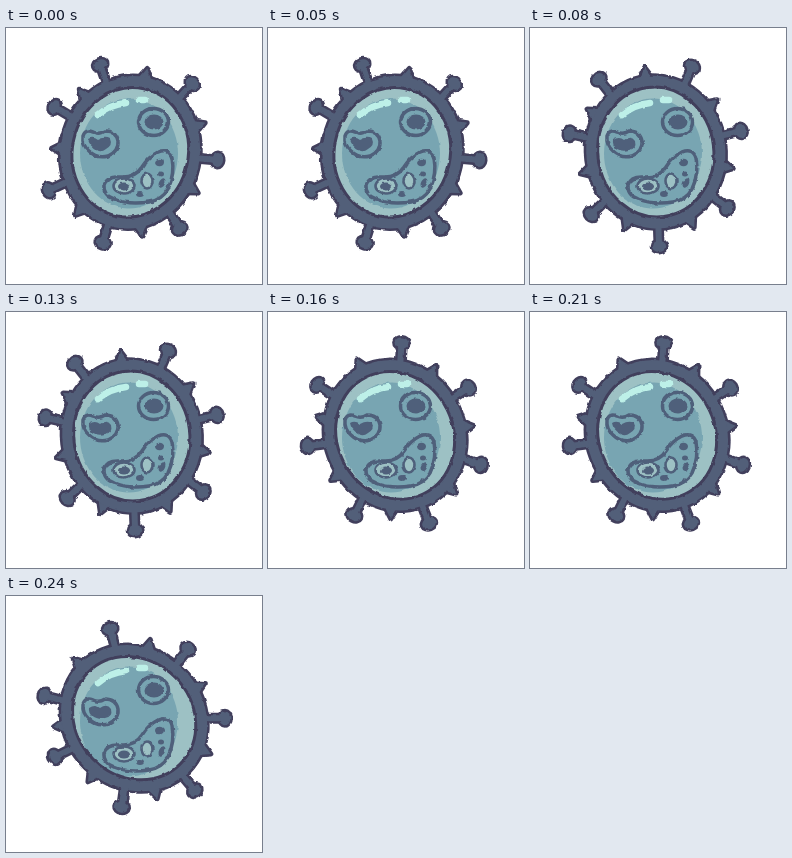
Recreate the animation shown at these times as an HTML page. Size 256 by 256 pixels, loop 0.32 s.

```html
<!DOCTYPE html>
<html lang="en">
<head>
<meta charset="utf-8">
<title>Rolling virus</title>
<style>
  html, body { margin: 0; width: 100%; height: 100%; overflow: hidden; background: #fff; }
  svg { display: block; width: 100vw; height: 100vh; }
</style>
</head>
<body>
<svg id="stage" viewBox="0 0 256 256"></svg>
<script>
const POSES = 4, STEP = 80, TURN = -19, TILT = 12;
const SHELL = '#525f79', INK = '#413f5c', LINE = '#4f607b';
const PALE = '#9dc1c4', TEAL = '#78a5b2', SHINE = '#bdf0e8';

// The shell is an upright oval around its own origin; the knobs sit unevenly on it.
const WIDTH = 69.5, HEIGHT = 76.5;
const knobAngles = [-121, -60, -7, 45, 95, 143, 199];
const thornAngles = knobAngles.map((a, i) => (a + (knobAngles[i + 1] ?? knobAngles[0] + 360)) / 2);

const ellipse = (cx, cy, rx, ry, attrs = '') =>
  `<ellipse cx="${cx}" cy="${cy}" rx="${rx}" ry="${ry}" ${attrs}/>`;
const path = (d, attrs = '') => `<path d="${d}" ${attrs}/>`;

// Distance from the origin to a point raised above the shell.
function reach(angle, raise) {
  const a = angle * Math.PI / 180;
  return 1 / Math.hypot(Math.cos(a) / (WIDTH + raise), Math.sin(a) / (HEIGHT + raise));
}

function knob(angle) {
  const r = reach(angle, 18);
  return `<g transform="rotate(${angle})">` +
    path(`M0 0H${r}`, 'stroke-width="var(--stem)"') + ellipse(r, 0, 5.5, 7) + '</g>';
}

function thorn(angle) {
  const r = reach(angle, 9);
  return path(`M${r} 0L${r - 14} 8V-8Z`, `transform="rotate(${angle})"`);
}

const outside = knobAngles.map(knob).join('') + thornAngles.map(thorn).join('') +
  ellipse(0, 0, WIDTH, HEIGHT);
const fluid = attrs => ellipse(0, 0, 58, 65, attrs);

const beans = [
  'M82 111Q87 108 92 112Q99 108 104 111Q107 117 100 121Q95 125 91 122Q83 118 82 111Z',
  'M83 112Q89 108 94 112Q101 107 105 113Q107 121 99 122Q92 124 87 121Q82 117 83 112Z'
];

const face = bean => `
  <g fill="none" stroke="${SHINE}" stroke-linecap="round" stroke-width="6.5">
    ${path('M92 87Q103 77 120 75M133 72L139 72')}
  </g>
  <g fill="none" stroke="${LINE}" stroke-width="3.5">
    ${path('M77 108Q79 101 87 104Q93 107 99 103Q110 103 112 113Q113 123 102 128Q91 131 83 123Q76 117 77 108Z')}
    ${ellipse(147.5, 94, 15, 13.5)}
    ${path('M98 157Q101 148 114 149Q129 150 136 139Q142 129 152 124Q163 120 166 130' +
      'Q169 146 162 161Q156 172 143 174Q122 177 108 171Q97 167 98 157Z')}
    ${ellipse(118, 158, 10.5, 7.5, `fill="${PALE}" stroke-width="2.6"`)}
    ${ellipse(141, 153, 5.5, 7.5, `fill="${PALE}" stroke-width="2.6"`)}
  </g>
  <g fill="${LINE}">
    ${path(bean)}
    ${ellipse(148, 94, 9.5, 7.5)}
    ${ellipse(118, 158.5, 6, 4)}
    ${ellipse(153.5, 134.5, 4.5, 3.8)}
    ${ellipse(155, 146, 3, 2.5)}
    ${ellipse(156, 155, 3, 5, 'transform="rotate(25 156 155)"')}
    ${ellipse(134, 166, 4, 3)}
  </g>`;

function cell(i) {
  const roll = `transform="rotate(${i * TURN} 124.3 119.7) translate(124.3 124.3) rotate(${TILT})"`;
  return `<filter id="rough${i}" x="0" y="0" width="256" height="256" filterUnits="userSpaceOnUse"
      color-interpolation-filters="sRGB">
    <feTurbulence type="fractalNoise" baseFrequency=".16" numOctaves="2" seed="${i + 3}"/>
    <feDisplacementMap in="SourceGraphic" scale="3" xChannelSelector="R" yChannelSelector="G"/>
  </filter>
  <g class="pose" filter="url(#rough${i})">
    <g ${roll}>
      <g fill="${INK}" stroke="${INK}" stroke-width="5" stroke-linejoin="round" style="--stem:11px">${outside}</g>
      <g fill="${SHELL}" stroke="${SHELL}" stroke-width="0" style="--stem:6px">${outside}</g>
      ${fluid(`fill="${PALE}"`)}
    </g>
    ${ellipse(123, 125.5, 49, 55, `fill="${TEAL}"`)}
    <g ${roll}>${fluid(`fill="none" stroke="${INK}" stroke-width="3"`)}</g>
    ${face(beans[i % beans.length])}
  </g>`;
}

document.getElementById('stage').innerHTML = Array.from({ length: POSES }, (_, i) => cell(i)).join('');
const poses = document.querySelectorAll('.pose');

function draw() {
  const current = Math.floor(performance.now() / STEP) % POSES;
  poses.forEach((pose, i) => pose.style.display = i === current ? '' : 'none');
  requestAnimationFrame(draw);
}
draw();
</script>
</body>
</html>
```
